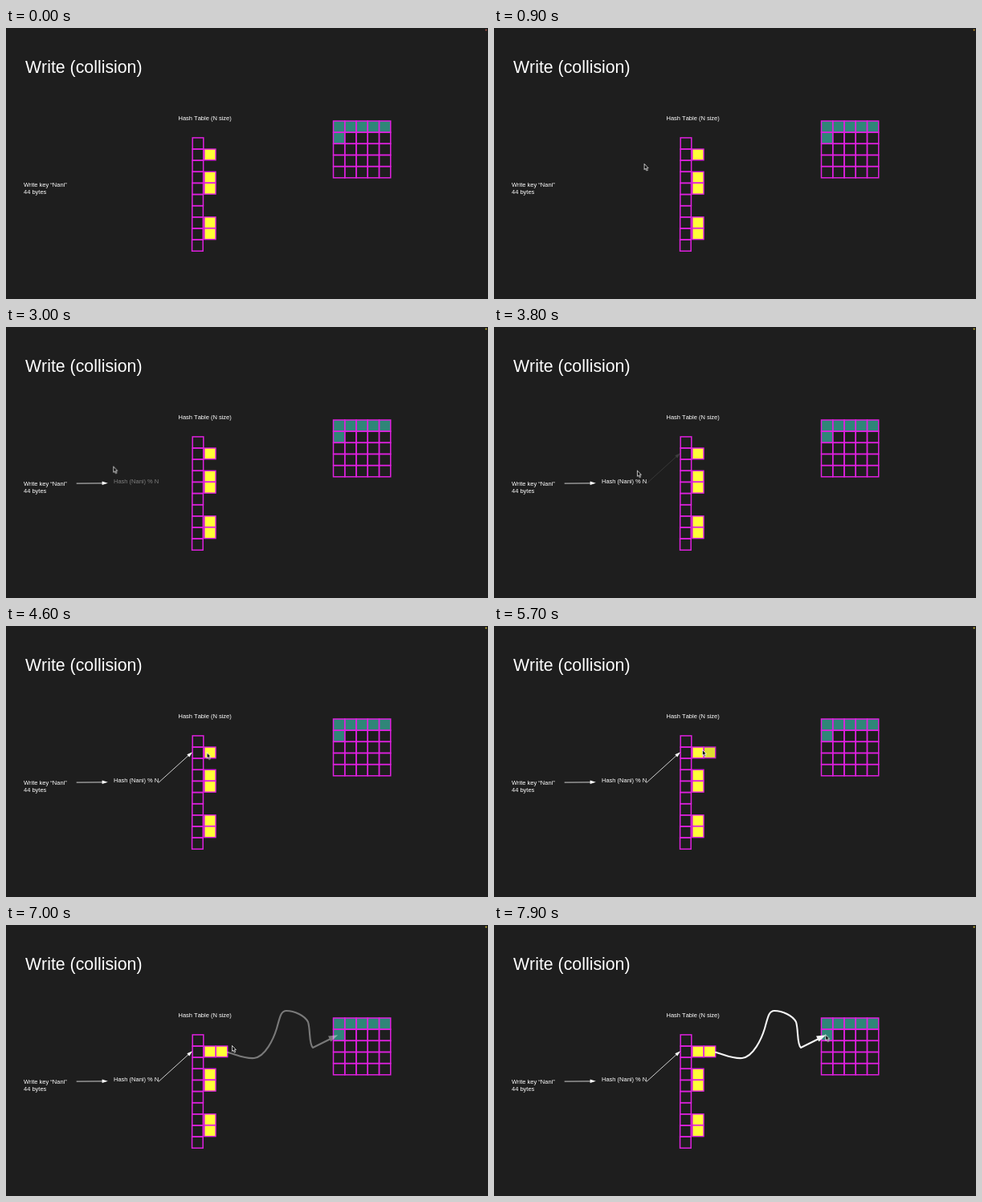
Write an HTML page that moves like this. It is 600 by 338 pixels and loops after 8 s.

```html
<!DOCTYPE html>
<html lang="en">
<head>
<meta charset="utf-8">
<title>Write (collision)</title>
<style>
  html, body { margin: 0; width: 100%; height: 100%; overflow: hidden; background: #1e1e1e; }
  svg { display: block; width: 600px; height: 338px; }
  text { font: 7.5px "Liberation Sans", Arial, sans-serif; font-kerning: none; fill: #fff; }
  .title { font-size: 21.3px; }
  .line { fill: none; stroke: #e020e0; stroke-width: 1.5; }
  .entry { fill: #ffff38; stroke: #e020e0; stroke-width: 1.4; }
  .used { fill: #2f8678; }
  .arrow { fill: #fff; stroke: #fff; stroke-width: .8; }
  .curve { fill: none; stroke: #f4f4f4; stroke-width: 2.1; stroke-linecap: round; }

  /* the picture advances in steps of 100 ms = 1.25% */
  .anim { animation: 8s steps(7) infinite; }
  #toHash { animation-name: toHash; }
  #hash { animation-name: hash; }
  #toSlot { animation-name: toSlot; }
  #chained { animation-name: chained; }
  #pointer { animation-name: pointer; }
  #dot { animation-name: dot; animation-timing-function: step-end; }
  #cursor { animation-name: cursor; }

  @keyframes toHash  { 0%, 23.75% { opacity: 0 } 32.5%, 100% { opacity: 1 } }
  @keyframes hash    { 0%, 33.75% { opacity: 0 } 42.5%, 100% { opacity: 1 } }
  @keyframes toSlot  { 0%, 46.25% { opacity: 0 } 55%, 100% { opacity: 1 } }
  @keyframes chained { 0%, 63.75% { opacity: 0 } 72.5%, 100% { opacity: 1 } }
  @keyframes pointer { 0%, 83.75% { opacity: 0 } 92.5%, 100% { opacity: 1 } }
  @keyframes dot     { 0% { fill: #b9584e } 1.25% { fill: #d39a28 } 23.75%, 100% { fill: #d8c234 } }

  @keyframes cursor {
    0%     { opacity: 0; transform: translate(212px, 154px); animation-timing-function: step-end }
    6.25%  { opacity: 1; transform: translate(212px, 154px); animation-timing-function: steps(5) }
    11.25% { transform: translate(186.6px, 169px); animation-timing-function: steps(9) }
    22.5%  { transform: translate(93px, 187px); animation-timing-function: steps(4) }
    27.5%  { transform: translate(76px, 189px); animation-timing-function: steps(8) }
    37.5%  { transform: translate(133.3px, 173.6px); animation-timing-function: steps(6) }
    45%    { transform: translate(160px, 184px); animation-timing-function: steps(10) }
    57.5%  { transform: translate(249.6px, 157.4px) }
    61.25% { transform: translate(249.6px, 157.4px); animation-timing-function: steps(8) }
    71.25% { transform: translate(259px, 154px); animation-timing-function: steps(9) }
    82.5%  { transform: translate(274px, 152px); animation-timing-function: steps(5) }
    87.5%  { transform: translate(281px, 150px); animation-timing-function: steps(9) }
    98.75%, 100% { opacity: 1; transform: translate(412.2px, 136.4px) }
  }
</style>
</head>
<body>
<svg viewBox="0 0 600 338">
  <text class="title" x="24" y="56.4">Write (collision)</text>
  <text x="214.5" y="114.6">Hash Table (N size)</text>
  <text x="22" y="198">Write key “Nani”</text>
  <text x="22" y="206.8">44 bytes</text>
  <circle id="dot" class="anim" cx="597.6" cy="2.4" r="1"/>

  <!-- hash table -->
  <g id="slots" class="line"></g>
  <g id="entries" class="entry"></g>
  <rect id="chained" class="entry anim" x="261.3" y="151" width="14.4" height="13.6"/>

  <!-- storage blocks -->
  <path class="used" d="M407.5 116h71.3v14.2h-57.1v14.1h-14.2z"/>
  <g id="blocks" class="line"></g>

  <g id="toHash" class="arrow anim">
    <path d="M87.7 195.1L120 194.9"/>
    <path stroke="none" d="M126.8 194.8l-7.2-2.2v4.5z"/>
  </g>
  <text id="hash" class="anim" x="134" y="195.3">Hash (Nani) % N</text>
  <g id="toSlot" class="arrow anim">
    <path d="M189.6 195.6L227 161.6"/>
    <path stroke="none" d="M232 157.2l-6.7 3.1 3 3.3z"/>
  </g>
  <g id="pointer" class="anim">
    <path class="curve" d="M276 158.7C288 162 297 167 309 166C323 164 333 142 337 129C341 115 342 107 349 107C359 107 372 113 376 121C379 130 377 149 382 153L404 142"/>
    <path fill="#f4f4f4" d="M413.2 137.2L401 138.6 404.4 145.6z"/>
  </g>

  <g id="cursor" class="anim">
    <path fill="#000" stroke="#fff" stroke-width=".8" stroke-linejoin="round" d="M.4.4V7.6L2 6.2 3.3 9 4.6 8.4 3.3 5.7H5.4z"/>
  </g>
</svg>
<script>
  const size = 14.13;

  function addRect(id, x, y, w, h) {
    const rect = document.createElementNS("http://www.w3.org/2000/svg", "rect");
    const box = { x, y, width: w, height: h };
    for (const key in box) rect.setAttribute(key, box[key]);
    document.getElementById(id).append(rect);
  }

  for (let row = 0; row < 10; row++) {
    addRect("slots", 232.2 - row * 0.07, 136.9 + row * size, 13.6, size);
  }
  for (const row of [1, 3, 4, 7, 8]) {
    addRect("entries", 246.9, 136.9 + row * size, 14.1, 13.7);
  }
  for (let i = 0; i < 25; i++) {
    addRect("blocks", 407.5 + (i % 5) * 14.26, 116 + Math.floor(i / 5) * 14.16, 14.2, 14.16);
  }
</script>
</body>
</html>
```
